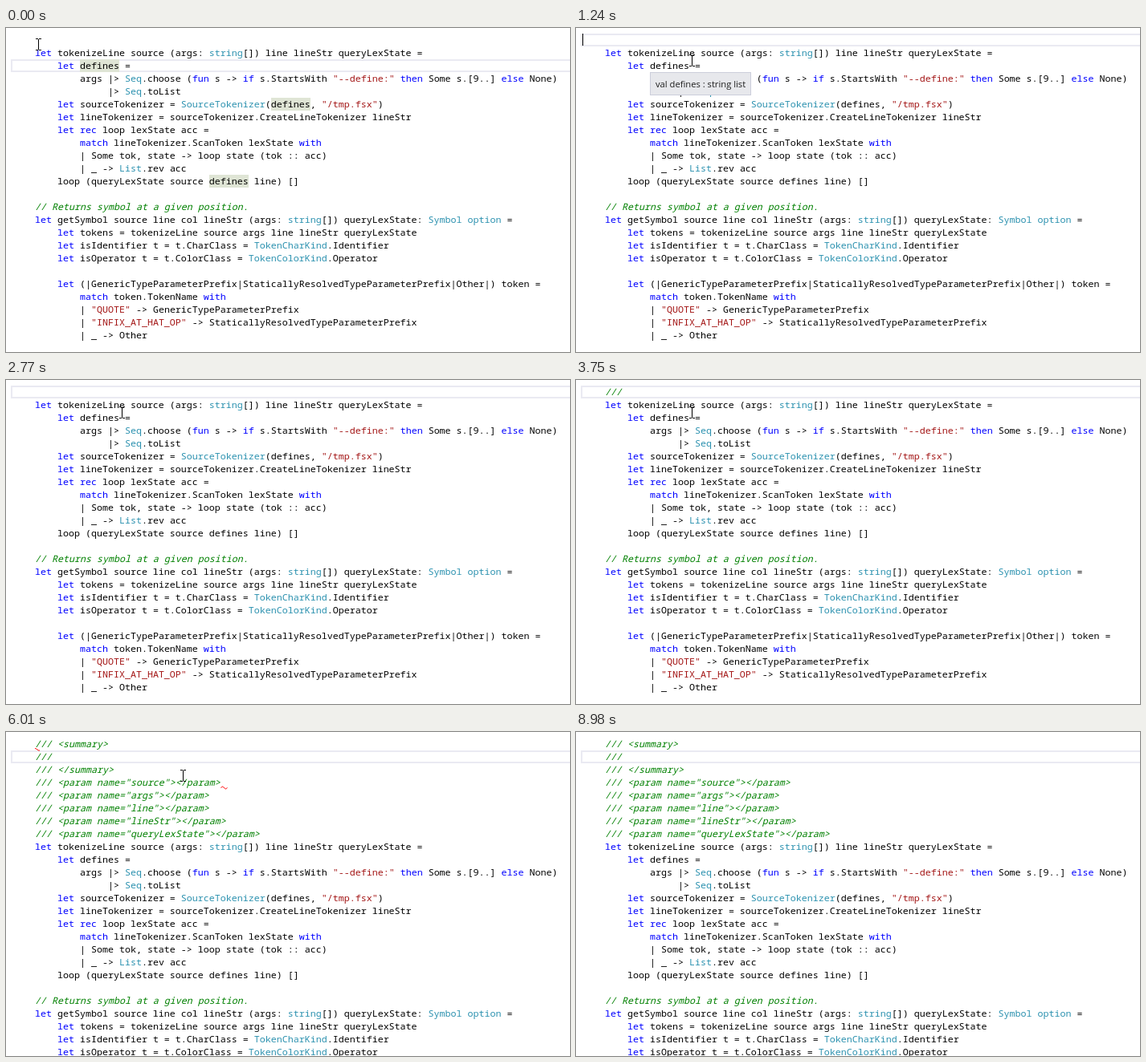
Recreate the animation shown at these times as an HTML page. Size 702 px wide and 404 px high, loop 9.1 s.

```html
<!DOCTYPE html>
<html lang="en">
<head>
<meta charset="utf-8">
<title>Doc comment completion</title>
<style>
html, body { margin: 0; width: 100%; height: 100%; overflow: hidden; background: #fff; }
#stage { position: relative; width: 702px; height: 404px; overflow: hidden; }
#stage > * { position: absolute; animation: 9.1s step-end infinite; }
pre {
  margin: 0; left: 36px; color: #000;
  font: 11.6667px/16px "Noto Sans Mono", "DejaVu Sans Mono", monospace;
  font-variant-ligatures: none;
}
pre b { font-weight: 400; color: #00f; }
pre i { font-style: normal; color: #2b91af; animation: types 9.1s step-end infinite; }
pre s { text-decoration: none; color: #a31515; }
pre em, .doc { font-style: italic; color: #008000; }

#line {
  left: 6px; top: 39px; width: 710px; height: 16px; box-sizing: border-box;
  border: 2px solid #eaeaf2; animation-name: line;
}
.mark { width: 49px; height: 16px; background: #dfe5d5; animation-name: marks !important; }
#code { top: 23px; animation-name: code; }
#typed { top: 7px; width: 0; overflow: hidden; animation-name: typed; }
#doc { top: 7px; visibility: hidden; animation-name: doc; }
#wave { left: 0; top: 0; visibility: hidden; animation-name: wave; }
#tip {
  left: 92px; top: 55px; width: 126px; height: 29px; box-sizing: border-box; padding-left: 6px;
  border: 1px solid #cccedb; background: #e7e8ec; color: #1e1e1e; opacity: 0;
  font: 11.2px/27px "Open Sans", "Noto Sans", sans-serif; white-space: nowrap;
  animation-name: tip;
}
#caret {
  left: 8px; top: 7px; width: 1px; height: 15px; background: #000; opacity: 0;
  animation-name: caret, blink !important;
}
#mouse { left: -4px; top: -8px; transform: translate(40px, 21px); animation-name: mouse; }

@keyframes line { 3.186% { top: 7px } 47.362% { top: 23px } }
@keyframes marks { 3.186% { visibility: hidden } }
@keyframes code { 47.362% { top: 135px } }
@keyframes doc { 47.362% { visibility: visible } }
@keyframes wave { 47.362% { visibility: visible } 67.362% { visibility: hidden } }
@keyframes types { 36.483% { color: #000 } 41.208% { color: #2b91af } }
@keyframes typed {
  34.835% { width: 8px; color: #000 }
  36.483% { width: 15px; color: #008000 }
  38.131% { width: 23px }
  47.362% { width: 0 }
}
@keyframes tip {
  12.307% { opacity: 1 }
  16.923% { opacity: .5 }
  18.021% { opacity: 0 }
}
@keyframes caret {
  21.098% { left: 15px }
  22.637% { left: 22px }
  24.175% { left: 29px }
  25.934% { left: 36px }
  34.835% { left: 43px }
  36.483% { left: 50px }
  38.131% { left: 57px; top: 7px }
  47.362%, 100% { left: 64px; top: 23px }
}
@keyframes blink {
  3.186%, 13.626%, 21.098%, 34.835%, 48.791%, 60%, 70.329%, 81.758%, 93.516% { opacity: 1 }
  9.23%, 19.56%, 30.439%, 41.208%, 53.186%, 64.395%, 76.153%, 88.461%, 98.681% { opacity: 0 }
}
@keyframes mouse {
  1.648% { transform: translate(41px, 17px) }
  4.725% { transform: translate(62px, 21px) }
  6.153% { transform: translate(98px, 30px) }
  7.692% { transform: translate(132px, 38px) }
  9.23% { transform: translate(144px, 41px) }
  65.934% { transform: translate(220px, 55px) }
  67.362% { transform: translate(330px, 75px) }
  68.901% { transform: translate(420px, 89px) }
  70.329% { transform: translate(463px, 93px) }
  77.582% { transform: translate(470px, 88px) }
  79.12% { transform: translate(482px, 80px) }
  80.439% { transform: translate(494px, 72px) }
  81.758% { transform: translate(499px, 69px) }
  83.406% { transform: translate(545px, 140px) }
  85.054% { transform: translate(620px, 270px) }
  86.703% { transform: translate(673px, 384px) }
  88.461% { transform: translate(676px, 400px) }
  90.109%, 100% { transform: translate(676px, 440px) }
}
</style>
</head>
<body>
<div id="stage">
<div id="line"></div>
<div class="mark" style="left:92px;top:39px"></div>
<div class="mark" style="left:330px;top:87px"></div>
<div class="mark" style="left:253px;top:183px"></div>
<pre id="code"><b>let</b> tokenizeLine source (args: <i>string</i>[]) line lineStr queryLexState =
    <b>let</b> defines =
        args |&gt; <i>Seq</i>.choose (<b>fun</b> s -&gt; <b>if</b> s.StartsWith <s>"--define:"</s> <b>then</b> Some s.[9..] <b>else</b> None)
             |&gt; <i>Seq</i>.toList
    <b>let</b> sourceTokenizer = <i>SourceTokenizer</i>(defines, <s>"/tmp.fsx"</s>)
    <b>let</b> lineTokenizer = sourceTokenizer.CreateLineTokenizer lineStr
    <b>let</b> <b>rec</b> loop lexState acc =
        <b>match</b> lineTokenizer.ScanToken lexState <b>with</b>
        | Some tok, state -&gt; loop state (tok :: acc)
        | _ -&gt; <i>List</i>.rev acc
    loop (queryLexState source defines line) []

<em>// Returns symbol at a given position.</em>
<b>let</b> getSymbol source line col lineStr (args: <i>string</i>[]) queryLexState: <i>Symbol option</i> =
    <b>let</b> tokens = tokenizeLine source args line lineStr queryLexState
    <b>let</b> isIdentifier t = t.CharClass = <i>TokenCharKind</i>.Identifier
    <b>let</b> isOperator t = t.ColorClass = <i>TokenColorKind</i>.Operator

    <b>let</b> (|GenericTypeParameterPrefix|StaticallyResolvedTypeParameterPrefix|Other|) token =
        <b>match</b> token.TokenName <b>with</b>
        | <s>"QUOTE"</s> -&gt; GenericTypeParameterPrefix
        | <s>"INFIX_AT_HAT_OP"</s> -&gt; StaticallyResolvedTypeParameterPrefix
        | _ -&gt; Other</pre>
<pre id="typed" class="doc">///</pre>
<pre id="doc" class="doc">/// &lt;summary&gt;
/// 
/// &lt;/summary&gt;
/// &lt;param name="source"&gt;&lt;/param&gt;
/// &lt;param name="args"&gt;&lt;/param&gt;
/// &lt;param name="line"&gt;&lt;/param&gt;
/// &lt;param name="lineStr"&gt;&lt;/param&gt;
/// &lt;param name="queryLexState"&gt;&lt;/param&gt;</pre>
<svg id="wave" width="300" height="80" fill="none" stroke="#f00">
  <path d="M36 20.5q1.5 0 3 1.5t3 1M267.5 69.5q2-3 4 0t4 0"/>
</svg>
<div id="tip">val defines : string list</div>
<div id="caret"></div>
<svg id="mouse" width="9" height="16" shape-rendering="crispEdges">
  <path d="M1 0h3v1h1v-1h3v1h-3v13h3v1h-3v-1h-1v1h-3v-1h3v-13h-3z"/>
</svg>
</div>
</body>
</html>
```
